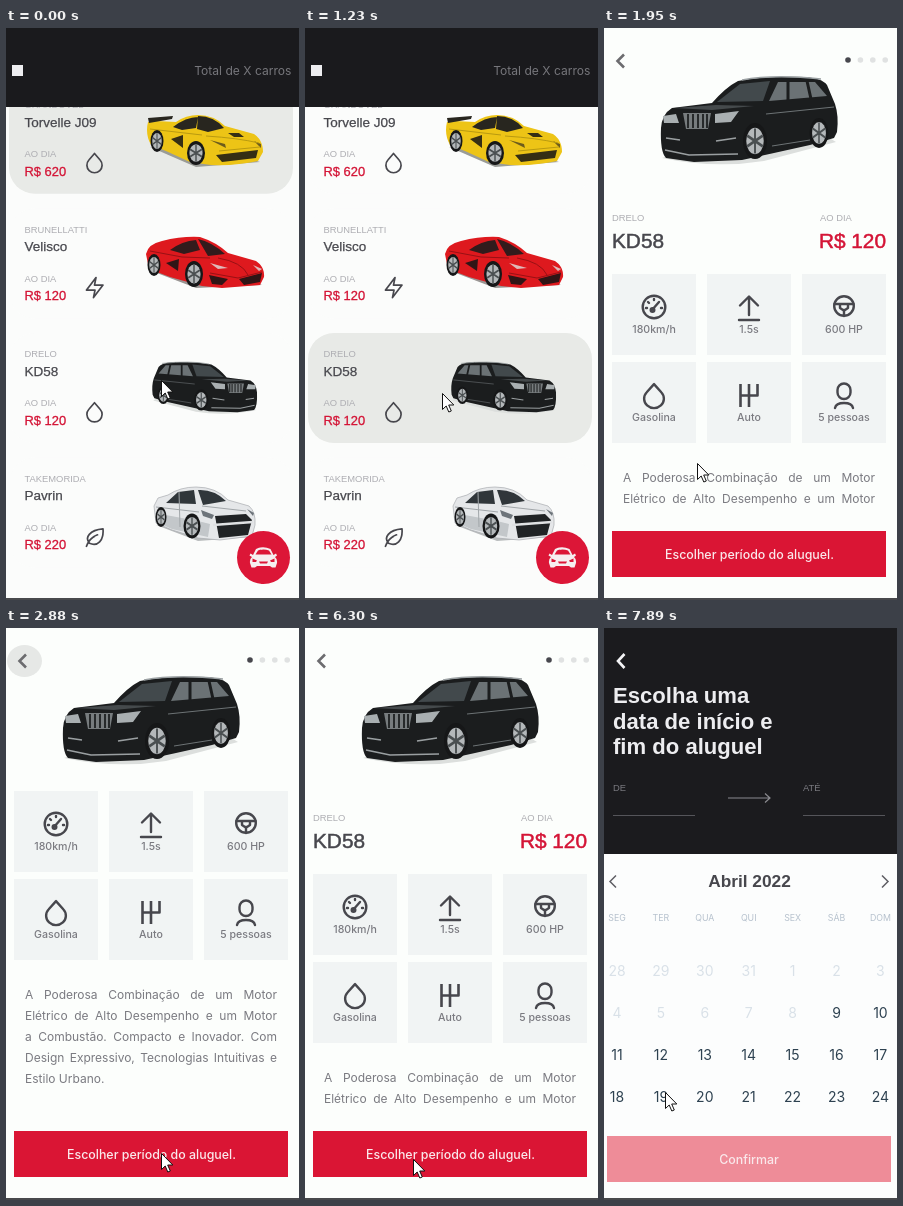
An HTML page that plays this animation: 293 px wide and 572 px high, repeating every 8000 ms.

```html
<!DOCTYPE html>
<html lang="pt-BR">
<head>
<meta charset="utf-8">
<title>Aluguel de carros</title>
<style>
html, body { margin: 0; width: 100%; height: 100%; overflow: hidden; background: #fcfdfc; }
svg { display: block; }
text { font: 12.1px Inter, sans-serif; }
.grot { font-family: "Liberation Sans", Arial, sans-serif; }
.label { font-size: 9.4px; fill: #aeaeb3; }
.name { font-size: 13.5px; fill: #47474d; stroke: #47474d; stroke-width: .25px; }
.price { font-size: 12.9px; fill: #d41436; stroke: #d41436; stroke-width: .3px; }
.big { font-size: 20.8px; stroke-width: .5px; }
.mid { text-anchor: middle; }
.end { text-anchor: end; }
.button { font-size: 12.4px; font-weight: 500; fill: #fae8eb; }
.spec { font-size: 10.6px; font-weight: 500; fill: #7a7a80; }
.title { font-size: 22.1px; font-weight: bold; fill: #ededf0; }
.month { font-size: 17.3px; font-weight: bold; fill: #47474d; }
.week { font-size: 8.8px; fill: #b6c1cd; }
.day { font-size: 14px; fill: #2d4150; }
.off { fill: #d9e1e8; }
.line { fill: none; stroke: #47474d; stroke-linejoin: round; stroke-linecap: round; }
.about { font: 12px/21px Inter, sans-serif; color: #7a7a80; }
.about div { white-space: nowrap; text-align: justify; text-align-last: justify; }
.about div:last-child { text-align-last: left; }

.anim { animation: 8s step-end infinite; }
#list { animation-name: list; }
#detail { animation-name: detail; }
#settle { animation-name: settle; }
#bar { animation-name: bar; }
#photo { animation-name: photo; }
#scroll { animation-name: scroll; }
#halo { animation-name: halo; }
#calendar { animation-name: calendar; }
#rule { animation-name: rule; }
#card0 { animation-name: card0; }
#card2 { animation-name: card2; }
#cursor { animation-name: cursor; }

@keyframes list { 0% { opacity: 1 } 19.125%, 100% { opacity: 0 } }
@keyframes detail { 0% { opacity: 0 } 19.125% { opacity: 1 } 80.625%, 100% { opacity: 0 } }
@keyframes settle { 0% { transform: translateY(2px) } 20.625%, 100% { transform: none } }
@keyframes bar { 0% { opacity: 1 } 20.625%, 100% { opacity: 0 } }
@keyframes photo { 0% { opacity: .4 } 20.625% { opacity: .75 } 22.5%, 100% { opacity: 1 } }
@keyframes scroll {
  0% { transform: none } 30.75% { transform: translateY(-83px) }
  39.375% { transform: translateY(-36px) } 40.875%, 100% { transform: none }
}
@keyframes halo {
  0% { opacity: 0 } 30.75% { opacity: 1 } 51.5% { opacity: .75 }
  53% { opacity: .5 } 54.5% { opacity: .25 } 56%, 100% { opacity: 0 }
}
@keyframes calendar { 0% { opacity: 0 } 80.625%, 100% { opacity: 1 } }
@keyframes rule { 0% { opacity: 1 } 82.125%, 100% { opacity: 0 } }
@keyframes card0 { 0% { fill: #e8eae7 } 6.75% { fill: #f2f4f1 } 8.25%, 100% { fill: #fbfcfb } }
@keyframes card2 { 0% { fill: #fbfcfb } 6.75% { fill: #e8eae7 } 8.25% { fill: #dddfdd } 10.125%, 100% { fill: #e8eae7 } }
@keyframes cursor {
  0% { transform: translate(155px, 352px) }
  6.75% { transform: translate(146px, 358px) }
  8.25% { transform: translate(137px, 365px) }
  24.375% { transform: translate(93px, 435px) }
  25.875% { transform: translate(106px, 425px) }
  34.125% { transform: translate(117px, 467px) }
  36% { transform: translate(155px, 525px) }
  37.5% { transform: translate(160px, 433px) }
  39.375% { transform: translate(155px, 422px) }
  42.75% { transform: translate(130px, 470px) }
  44.375% { transform: translate(117px, 518px) }
  46.125% { transform: translate(112px, 525px) }
  47.75% { transform: translate(108px, 531px) }
  88.125% { transform: translate(144px, 477px) }
  90% { transform: translate(122px, 440px) }
  91.5% { transform: translate(174px, 390px) }
  93% { transform: translate(149px, 423px) }
  94.875% { transform: translate(85px, 444px) }
  96.75% { transform: translate(74px, 447px) }
  98.625%, 100% { transform: translate(61px, 464px) }
}
</style>
</head>
<body>
<svg width="293" height="572" viewBox="0 0 293 572">
  <defs>
    <path id="drop" vector-effect="non-scaling-stroke" d="M0-9.500-5.600-3A7.600 7.600 0 1 0 5.600-3Z"/>
    <path id="bolt" d="M1.500-10-8 2.500H.5L-1 10 8.500-2.500H0Z"/>
    <path id="leaf" d="M-5 6.500C-10 1-5-7 8.500-8 9.500 4 3 10-5 6.500M-8 9.500C-6 3-2 0 3-2"/>
    <g id="suv">
      <path d="M58 130Q110 141 160 133L232 114 222 108 70 126Z" fill="#dcdfdd"/>
      <path d="M57 100Q58 86 68 80L108 75Q122 59 134 53 160 48 200 49 218 50 223 57L231 76Q235 88 233 104L230 110 206 117 170 125 138 132 90 134 62 130Q56 124 57 100Z" fill="#1b1d1e"/>
      <path d="M113 74 136 56 166 53 159 73Z" fill="#42494c"/>
      <path d="M165 73 174 54 211 54 223 68Z" fill="#6b7275"/>
      <path d="M184 53V73M203 53 207 71" stroke="#1b1d1e" stroke-width="3"/>
      <path d="M138 52Q170 46 217 51" stroke="#9ba1a3" stroke-width="1.300" fill="none"/>
      <path d="M70 80 112 77 150 78 108 82Z" fill="#454a4c"/>
      <path d="M162 86 230 79M168 118 206 112" stroke="#6d7375" fill="none"/>
      <path d="M79 85H107L104 101H82Z" fill="#777c7e"/>
      <path d="M84 86V100M89 86V100M94 86V100M99 86V100M103 86V100" stroke="#26292a" stroke-width="2"/>
      <path d="M59 88 72 86 75 95 60 95ZM111 86 135 83 127 94 111 95Z" fill="#a9afb1"/>
      <path d="M61 122 85 127 134 126M62 110 76 112M112 113 132 110" stroke="#9a9fa1" stroke-width="1.700" fill="none"/>
    </g>
  </defs>

  <g id="list" class="anim">
    <rect width="293" height="572" fill="#fbfcfb"/>
    <g id="rows"></g>
    <g id="coupe">
      <path d="M144 119 190 139 254 134 240 130Z" fill="#9a9c98"/>
      <path d="M142 94 150 93 170 94Q180 87 192 87 208 87 219 98L248 106Q257 112 257 124L252 133Q230 138 205 137L184 134 160 123 145 117Q139 106 142 94Z" fill="#edc416"/>
      <path d="M167 99Q180 89 192 89L190 100 176 102ZM192 88Q208 88 218 100L202 104 191 101ZM142 90 167 88 166 91 143 95Z" fill="#28261f"/>
      <path d="M210 127 252 122 250 130 216 134ZM222 105 233 105 238 109 228 109ZM165 111 177 107 177 120Z" fill="#352e14"/>
      <path d="M204 112 219 116 220 120ZM248 113 255 116 255 120Z" fill="#6d5c1c"/>
      <path d="M200 108Q232 110 253 115M144 101 196 107M213 123 254 119" stroke="#b99a10" fill="none"/>
    </g>
    <g id="wedge">
      <path d="M143 242 190 260 256 257 240 250Z" fill="#9a9694"/>
      <path d="M140 226Q142 216 156 213 176 208 194 209 210 214 222 225L250 233Q259 239 258 249L254 257 216 260 196 258 164 249 143 241Z" fill="#de191e"/>
      <path d="M164 222Q176 213 190 212L194 222 178 226ZM192 211Q206 214 219 226L202 228Z" fill="#321b1c"/>
      <path d="M203 247 222 251 216 257 206 256ZM233 251 256 245 254 254 238 257ZM160 235 173 231 172 243Z" fill="#301516"/>
      <path d="M204 235 222 240 212 241ZM247 237 256 241 253 243Z" fill="#dfb9b9"/>
      <path d="M212 230Q236 234 242 247M144 223 176 229 204 230M204 245 232 250 256 244" stroke="#991014" fill="none"/>
    </g>
    <use href="#suv" transform="translate(284.8 305.3) scale(-.593 .59)"/>
    <g id="sedan">
      <path d="M150 497 192 513 247 509 240 502Z" fill="#b9bcbd"/>
      <path d="M148 478 152 470 162 467Q174 459 190 459 210 459 222 472L243 478Q250 484 249 497L246 508 214 512 192 510 166 502 150 495Z" fill="#e5e7e9" stroke="#a9adb0" stroke-width=".7"/>
      <path d="M149 485 192 493 204 496 202 509 166 501 150 494Z" fill="#c3c7ca"/>
      <path d="M160 475 172 464 188 462 190 476ZM192 462Q208 461 220 473L197 477Z" fill="#30363a"/>
      <path d="M209 488 240 486 246 492 242 507 213 510Z" fill="#202325"/>
      <path d="M207 497 247 494" stroke="#dfe1e3" stroke-width="2.500"/>
      <path d="M195 482 208 487 206 491 197 488ZM241 481 248 485 247 488Z" fill="#6d747a"/>
      <path d="M150 479 193 484M173 464 174 499M196 478 240 483" stroke="#a1a6a9" fill="none"/>
    </g>
    <rect width="293" height="79" fill="#1a1a1d"/>
    <rect x="6" y="37" width="11" height="11" fill="#ededf0"/>
    <text class="end" x="285.500" y="47" fill="#76767b">Total de X carros</text>
    <circle cx="257.500" cy="529.500" r="26.500" fill="#dc1637"/>
    <path d="M247 527 250 521Q257 517.500 264.500 521L267.500 527 270 525.500 271 527.500 269 529Q271.500 531 271 535L269.500 539.500H266L264 538H251L249 539.500H245.500L244 535Q243.500 531 246 529L243.500 527.500 244.500 525.500Z" fill="#f6eef0"/>
    <path d="M249.500 526.500 252 522.500Q257.500 520.500 263 522.500L265.500 526.500ZM246.500 530.500 251 532.500 250 534H246.500ZM268.500 530.500 264 532.500 265 534H268.500ZM253 533.500H262L261 535.500H254Z" fill="#dc1637"/>
  </g>

  <g id="detail" class="anim">
    <rect width="293" height="572" fill="#fcfefc"/>
    <g id="settle" class="anim">
      <svg y="145" width="293" height="337" viewBox="0 145 293 337">
        <g id="scroll" class="anim">
          <text class="grot label" x="8" y="193">DRELO</text>
          <text class="grot label" x="216" y="193">AO DIA</text>
          <text class="grot name big" x="8" y="220">KD58</text>
          <text class="grot price big end" x="282" y="220">R$ 120</text>
          <g id="tiles"></g>
          <g class="line" stroke-width="2.400">
            <circle cx="50" cy="279" r="11.300"/>
            <path d="M48 282 55 274M42 280H43M44 274 45 275M50 271V272M57 280H58"/>
            <circle cx="48.500" cy="282" r="1.800"/>
            <path d="M145 287V269M136 277.500 145 268.500 154 277.500M135 292H155"/>
            <circle cx="240" cy="278" r="9.800"/>
            <path d="M230.500 276H249.500M236 276V280L239 282H241L244 280V276M240 282V288"/>
            <use href="#drop" transform="translate(50 368) scale(1.3 1.25)"/>
            <path d="M136.500 356V379M145 356V379M153.500 356V367.500H136.500" stroke-linecap="butt" stroke-width="2.600"/>
            <rect x="233.500" y="355.500" width="13" height="15.500" rx="6.500"/>
            <path d="M231 380Q232 375 240 375T249 380"/>
          </g>
          <foreignObject x="19" y="439" width="252" height="110">
            <div class="about">
              <div>A Poderosa Combinação de um Motor</div>
              <div>Elétrico de Alto Desempenho e um Motor</div>
              <div>a Combustão. Compacto e Inovador. Com</div>
              <div>Design Expressivo, Tecnologias Intuitivas e</div>
              <div>Estilo Urbano.</div>
            </div>
          </foreignObject>
        </g>
      </svg>
      <use id="photo" class="anim" href="#suv"/>
      <ellipse id="halo" class="anim" cx="18.500" cy="33" rx="17.500" ry="16" fill="#e6e8e6"/>
      <path d="M20 26.500 13.500 33 20 39.500" fill="none" stroke="#6c6c6f" stroke-width="2.600"/>
      <g id="dots"></g>
      <rect x="8" y="503" width="274" height="46" fill="#da1534"/>
      <text class="button mid" x="145.500" y="530.500">Escolher período do aluguel.</text>
    </g>
    <rect id="bar" class="anim" width="293" height="21" fill="#1a1a1d"/>
  </g>

  <g id="calendar" class="anim">
    <rect width="293" height="572" fill="#fcfdfd"/>
    <rect width="293" height="226" fill="#1b1b1e"/>
    <path d="M20.500 26 14 33 20.500 40" fill="none" stroke="#f4f4f6" stroke-width="2.600"/>
    <text class="grot title" x="9" y="75">Escolha uma</text>
    <text class="grot title" x="9" y="100.500">data de início e</text>
    <text class="grot title" x="9" y="126">fim do aluguel</text>
    <text class="grot label" x="9" y="162.500" style="fill:#7a7a80">DE</text>
    <text class="grot label" x="199" y="162.500" style="fill:#7a7a80">ATÉ</text>
    <text class="grot month mid" x="145.500" y="259">Abril 2022</text>
    <path d="M9 187.500H91M199 187.500H281" stroke="#55555a"/>
    <path d="M124 170H166M161 165.500 166 170 161 174.500" fill="none" stroke="#8a8a8f" stroke-width="1.200"/>
    <path d="M12 247.500 6 253.500 12 259.500M278 247.500 284 253.500 278 259.500" fill="none" stroke="#5f5f65" stroke-width="1.500"/>
    <path id="rule" class="anim" d="M0 311.500H293" stroke="#e6e8e9"/>
    <g id="days"></g>
    <rect x="3" y="508" width="284" height="46" fill="#ee8c98"/>
    <text class="button mid" x="145" y="535.500">Confirmar</text>
  </g>

  <rect y="570" width="293" height="2" fill="#48494c"/>
  <path id="cursor" class="anim" d="M.5.5V16.500L4.200 13 6.800 19 9.300 18 6.700 12H11.800Z" fill="#fff" stroke="#111"/>
</svg>
<script>
const add = (id, items) => document.getElementById(id).innerHTML += items.join("");

const wheel = (x, y, rx, ry) => `
  <g transform="translate(${x} ${y}) scale(${rx / 10} ${ry / 10})">
    <circle r="10" fill="#161718"/>
    <circle r="7.300" fill="#b4b8ba"/>
    <path d="M0-7V7M-6.500-3 6.500 3M-6.500 3 6.500-3" stroke="#4a4f51" stroke-width="1.600"/>
  </g>`;
add("suv", [wheel(151, 113, 12, 18), wheel(215, 105, 9.5, 15)]);
add("coupe", [wheel(190, 125, 9, 12), wheel(151, 113, 6.5, 11)]);
add("wedge", [wheel(188, 246, 9, 13), wheel(148, 237, 6.5, 11)]);
add("sedan", [wheel(186, 498, 8.5, 12.5), wheel(155, 489, 5.5, 10)]);

const cars = [
  ["GRANDOVEL", "Torvelle J09", 620, "drop"],
  ["BRUNELLATTI", "Velisco", 120, "bolt"],
  ["DRELO", "KD58", 120, "drop"],
  ["TAKEMORIDA", "Pavrin", 220, "leaf"]
];
add("rows", cars.map(([brand, name, price, fuel], i) => `
  <g transform="translate(0 ${124.6 * i})">
    <rect id="card${i}" class="anim" x="3" y="55.800" width="284" height="110" rx="26" fill="#fbfcfb"/>
    <text class="grot label" x="18.500" y="80">${brand}</text>
    <text class="grot name" x="18.500" y="98.500">${name}</text>
    <text class="grot label" x="18.500" y="129">AO DIA</text>
    <text class="grot price" x="18.500" y="147.500">R$ ${price}</text>
    <use href="#${fuel}" class="line" stroke-width="1.700" x="88.500" y="135"/>
  </g>`));

const specs = ["180km/h", "1.5s", "600 HP", "Gasolina", "Auto", "5 pessoas"];
add("tiles", specs.map((label, i) => {
  const x = 8 + 95 * (i % 3), y = 246 + 88 * Math.floor(i / 3);
  return `<rect x="${x}" y="${y}" width="84" height="81" fill="#f1f4f4"/>
    <text class="spec mid" x="${x + 42}" y="${y + 59}">${label}</text>`;
}));

add("dots", [0, 1, 2, 3].map(i =>
  `<circle cx="${244 + 12.4 * i}" cy="32" r="2.800" fill="${i ? "#e0e2e2" : "#47474d"}"/>`));

const column = i => 13 + 43.9 * i;
const week = ["SEG", "TER", "QUA", "QUI", "SEX", "SÁB", "DOM"].map((name, i) =>
  `<text class="week mid" x="${column(i)}" y="293">${name}</text>`);
const days = Array.from({ length: 28 }, (_, i) => {
  const day = i < 4 ? 28 + i : i - 3;
  return `<text class="day mid ${i < 12 ? "off" : ""}" x="${column(i % 7)}" y="${348 + 42 * Math.floor(i / 7)}">${day}</text>`;
});
add("days", [...week, ...days]);
</script>
</body>
</html>
```
